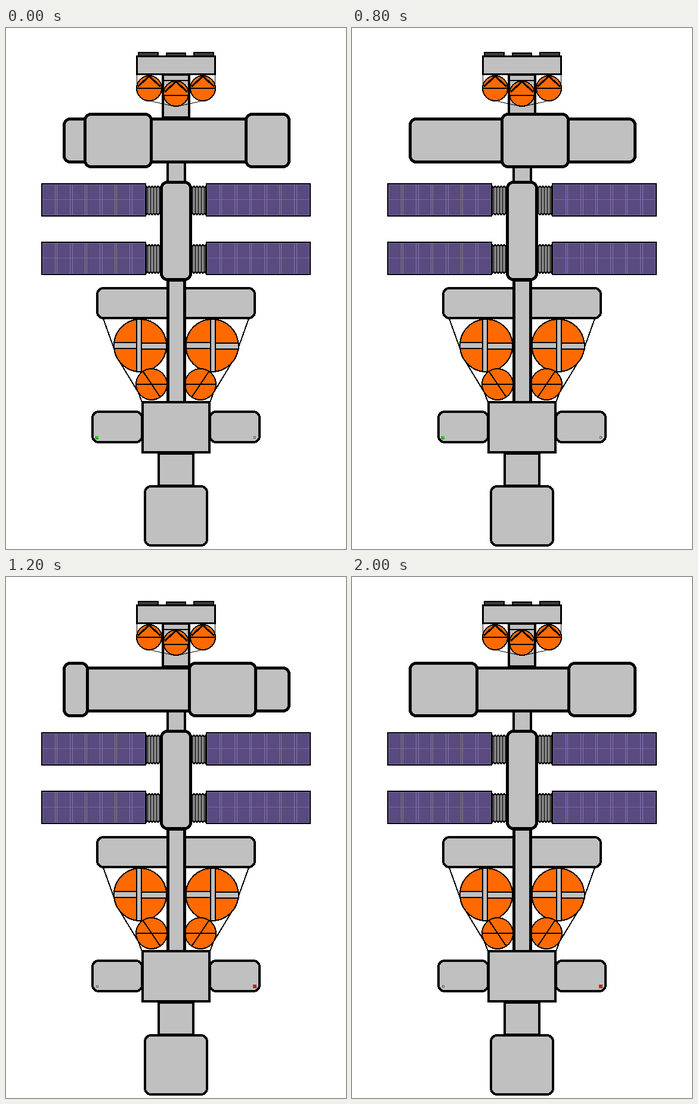
Animation, 570 px wide and 873 px high, one loop 2400 ms. Source, as an HTML page:

```html
<!DOCTYPE html>
<html lang="en">
<head>
<meta charset="utf-8">
<title>Space station</title>
<style>
html, body { margin: 0; width: 100%; height: 100%; overflow: hidden; background: #fff; }
svg { display: block; shape-rendering: crispEdges; }
</style>
</head>
<body>
<svg id="stage" width="570" height="873" viewBox="0 0 570 873"></svg>
<script>
const GREY = '#c0c0c0', ORANGE = '#ff6a00', DARK = '#3d3d38';
const STEP = 400;
const stage = document.getElementById('stage');

// Box given by its outer edges, with the stroke drawn inside them.
function box(x1, y1, x2, y2, r = 0, w = 4, fill = GREY) {
  return `<rect x="${x1 + w / 2}" y="${y1 + w / 2}" width="${x2 - x1 - w}" height="${y2 - y1 - w}" rx="${r}" fill="${fill}" stroke="#000" stroke-width="${w}"/>`;
}
function path(d, w = 2, color = '#000', fill = 'none') {
  return `<path d="${d}" fill="${fill}" stroke="${color}" stroke-width="${w}"/>`;
}
function ball(x, y, r) {
  return `<circle cx="${x}" cy="${y}" r="${r}" fill="${ORANGE}" stroke="#000" stroke-width="2"/>`;
}
function plain(x, y, w, h, fill) {
  return `<rect x="${x}" y="${y}" width="${w}" height="${h}" fill="${fill}"/>`;
}
// Mirrors a drawing about the vertical axis of the station.
function mirror(s) {
  return `<g transform="matrix(-1 0 0 1 570 0)">${s}</g>`;
}

function tank(x, y, bar) {
  return ball(x, y, 21) + path(`M${x - 21} ${bar}H${x + 21}`) +
    path(`M${x - 19} ${y - 3}L${x} ${y - 20}L${x + 19} ${y - 3}`, 3);
}

function panel(x, y) {
  let s = box(x, y, x + 176, y + 56, 0, 2, '#594a80');
  s += path(`M${x + 2.5} ${y + 2.5}h171v51h-171zM${x + 2} ${y + 27.5}h172`, 1, '#7768a0');
  for (let i = 0; i < 6; i++) {
    const a = x + 23.5 + i * 25;
    s += path(`M${a} ${y + 2}v52m${i % 2 ? 4 : 3} 0v-52`, 1, i % 2 ? '#8575ad' : '#808080');
  }
  return s;
}

function bellows(x, y) {
  const zig = 'l2.5 3l2.5 -3'.repeat(5), zag = 'l-2.5 -3l-2.5 3'.repeat(5);
  let ribs = '';
  for (let i = 0; i < 5; i++) ribs += `M${x + 2.5 + i * 5} ${y + 8}v41`;
  return path(`M${x} ${y + 5}${zig}V${y + 53}${zag}z`, 2, '#000', '#858585') + path(ribs, 1);
}

function head() {
  return box(221, 40, 256, 49, 0, 2, DARK) + box(268, 41, 302, 49, 0, 2, DARK) +
    box(314, 40, 349, 49, 0, 2, DARK) +
    box(261, 76, 309, 152) + path('M263 88H307') +
    path('M219.5 78V104Q223 118 240 122L272 129Q285 133 298 129L330 122Q347 118 350.5 104V78', 1) +
    tank(240, 101, 101) + tank(330, 101, 101) + tank(285, 110, 113) +
    box(218, 46, 352, 79, 0, 3);
}

function wings() {
  let s = '';
  for (const y of [260, 358]) {
    s += bellows(235, y) + bellows(310, y) + panel(59, y) + panel(335, y);
  }
  return s + box(258, 256, 312, 424, 10, 5);
}

function bigTank(x, rib) {
  return ball(x, 532, 44) +
    path(`M${x - 44} 527L${x + 44} 528V538L${x - 44} 537z`, 2, '#000', GREY) +
    path(`M${rib - 4} 488h8v88h-8z`, 2, '#000', GREY);
}

function tail() {
  const strap = path('M163 487L181 537L188 555L222 611L228 627', 2);
  const smallTank = ball(244, 597, 26) + path('M218 597H270M230 576L259 619');
  return strap + mirror(strap) +
    box(151, 434, 419, 488, 10) +
    bigTank(225, 223) + bigTank(345.5, 347) +
    smallTank + mirror(smallTank) +
    plain(269, 422, 33, 206, '#000') + plain(274, 425, 23, 202, GREY) +
    box(143, 641, 230, 696, 10) + box(340, 641, 427, 696, 10) +
    box(231, 766, 339, 869, 10) + box(254, 711, 316, 769) +
    box(227, 625, 343, 713);
}

// Outer left and right edges of the sliding sleeves at each step.
const sleeves = [
  [[130, 246], [400, 477]],
  [[189, 305], [433, 477]],
  [[249, 365]],
  [[95, 139], [305, 421]],
  [[95, 161], [331, 447]],
  [[95, 212], [361, 477]]
];

function lamp(x, on, color) {
  if (!on) return `<rect x="${x + .5}" y="684.5" width="3" height="3" fill="${GREY}" stroke="#606060"/>`;
  return color === 'red'
    ? plain(x - 1, 683, 6, 6, '#d01818')
    : plain(x - 1, 684, 5, 5, '#007000') + plain(x, 684, 4, 4, '#00e000');
}

stage.innerHTML = head() + box(269, 222, 302, 262) + box(95, 150, 477, 227, 10, 5) +
  '<g id="sleeves"></g>' + wings() + tail() + '<g id="lamps"></g>';
const sleeveLayer = document.getElementById('sleeves');
const lampLayer = document.getElementById('lamps');

let shown = -1;
function draw(time) {
  const step = Math.floor(time / STEP) % sleeves.length;
  if (step === shown) return;
  shown = step;
  sleeveLayer.innerHTML = sleeves[step].map(([a, b]) => box(a, 142, b, 235, 10, 5)).join('');
  const even = step % 2 === 0;
  lampLayer.innerHTML = lamp(151, even, 'green') + lamp(415, !even, 'red');
}

const start = performance.now();
function tick() {
  draw(performance.now() - start);
  requestAnimationFrame(tick);
}
draw(0);
requestAnimationFrame(tick);
</script>
</body>
</html>
```
